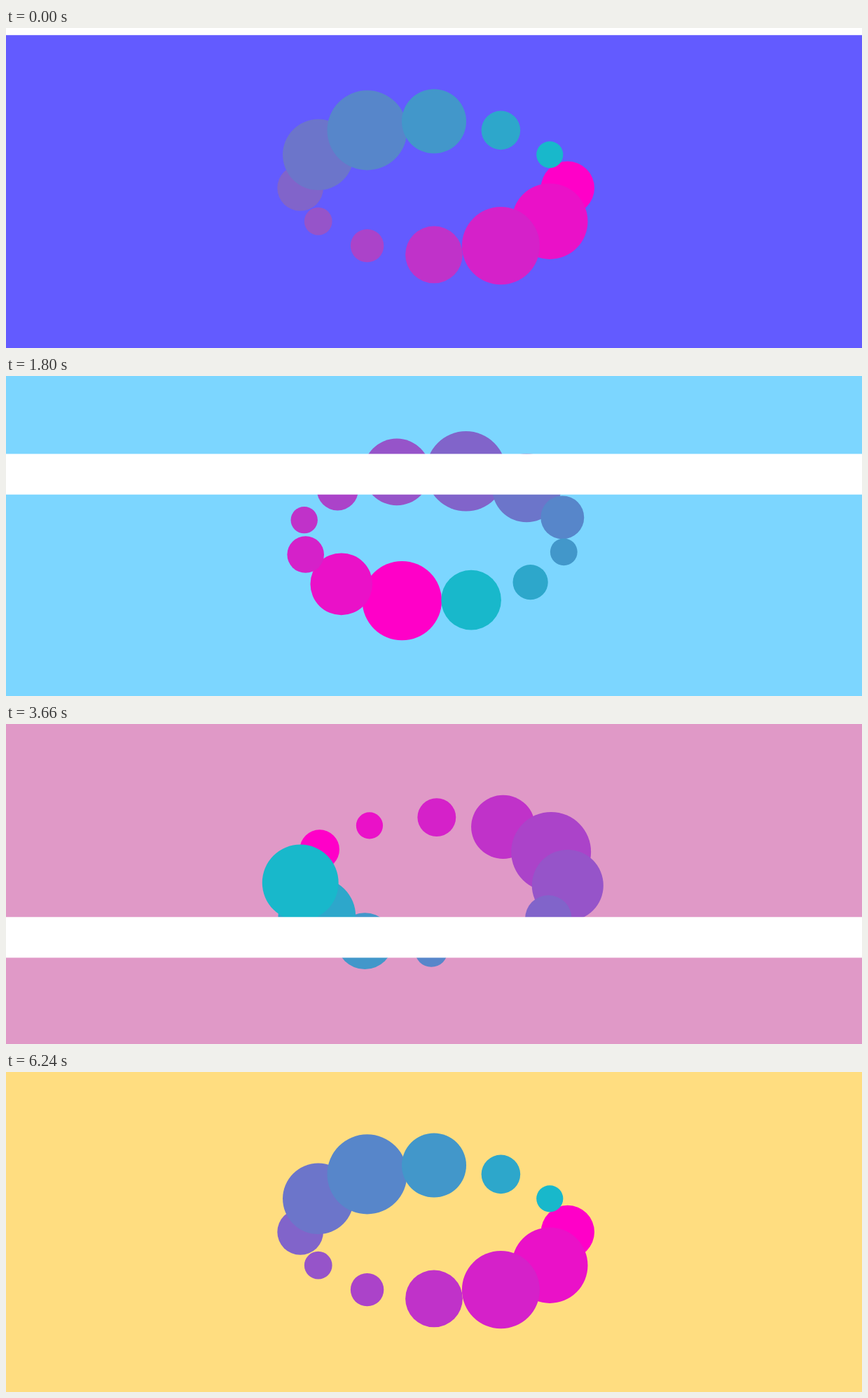
Animation, 1222 px wide and 458 px high, one loop 6.3 s. Source, as an HTML page with a canvas:

```html
<!DOCTYPE html>
<html lang="en">
<head>
<meta charset="utf-8">
<title>Orbiting circles</title>
<style>
  html, body { margin: 0; width: 100%; height: 100%; overflow: hidden; }
  canvas { display: block; width: 1222px; height: 458px; }
</style>
</head>
<body>
<canvas id="stage" width="1222" height="458"></canvas>
<script>
const canvas = document.getElementById('stage');
const ctx = canvas.getContext('2d');
const W = canvas.width, H = canvas.height;

const LOOP = 6300;
const STEP = 60;
const TURN = LOOP - STEP; // one full revolution, in ms
const COUNT = 12;

const SKY = [[99, 91, 255], [128, 233, 255], [255, 128, 181], [255, 221, 128]];
const FIRST = [255, 0, 200];
const LAST = [24, 184, 203];
const BAND = { start: -48, speed: 0.0886, height: 58.2 };

const mix = (a, b, k) =>
  `rgb(${a.map((v, i) => Math.round(v + (b[i] - v) * k)).join(',')})`;

function skyColor(progress) {
  const pos = progress * (SKY.length - 1);
  const i = Math.min(Math.floor(pos), SKY.length - 2);
  return mix(SKY[i], SKY[i + 1], pos - i);
}

function drawCircle(i, phase) {
  const angle = phase + i * 2 * Math.PI / COUNT;
  const x = W / 2 + Math.cos(angle) * H / 2.4;
  const y = H / 2 + Math.sin(angle) * H / 4.8;
  const radius = H / 12 * (1 + Math.sin(i + phase) / 2);
  ctx.fillStyle = mix(FIRST, LAST, i / (COUNT - 1));
  ctx.beginPath();
  ctx.arc(x, y, radius, 0, 2 * Math.PI);
  ctx.fill();
}

function draw(time) {
  const progress = time / TURN;
  ctx.fillStyle = skyColor(progress);
  ctx.fillRect(0, 0, W, H);
  for (let i = 0; i < COUNT; i++) drawCircle(i, progress * 2 * Math.PI);
  ctx.fillStyle = '#fff';
  ctx.fillRect(0, BAND.start + BAND.speed * time, W, BAND.height);
}

let origin = null;
function tick(now) {
  if (origin === null) origin = now;
  const time = Math.max(0, now - origin) % LOOP;
  draw(Math.floor(time / STEP) * STEP);
  requestAnimationFrame(tick);
}

draw(0);
requestAnimationFrame(tick);
</script>
</body>
</html>
```
